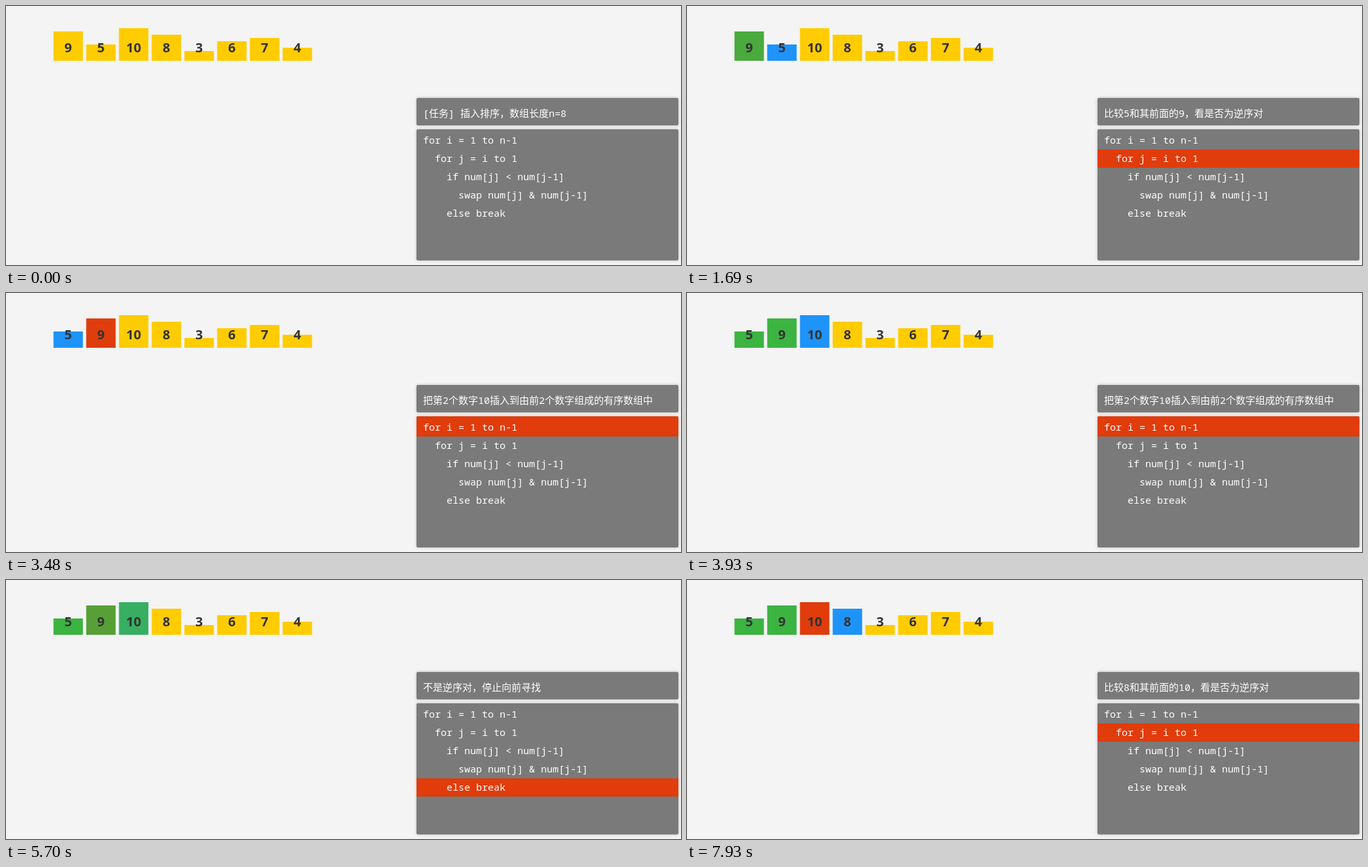
An HTML page for the animation above (8000 ms loop, 1031x397 px).

```html
<!DOCTYPE html>
<html lang="zh-CN">
<head>
<meta charset="utf-8">
<title>插入排序</title>
<style>
  html, body { margin: 0; width: 100%; height: 100%; overflow: hidden; background: #f4f4f4; }
  svg { display: block; }
  .num { font: 700 20px "Noto Sans", "Open Sans", sans-serif; fill: #333; text-anchor: middle; }
  .mono { font: 500 15px "Noto Sans Mono", "Noto Sans CJK SC", "Noto Sans CJK", monospace; fill: #fff; }
  .panel { fill: #7a7a7a; filter: drop-shadow(0 0 2px rgba(0, 0, 0, .25)); }
</style>
</head>
<body>
<svg id="stage" width="1031" height="397" viewBox="0 0 1031 397">
  <rect class="panel" x="627" y="141" width="400" height="42" rx="2"/>
  <rect class="panel" x="627" y="189" width="400" height="201" rx="2"/>
  <path id="mark" fill="#e03c0c"/>
  <text id="message" class="mono" x="637" y="170"></text>
</svg>
<script>
const LOOP = 8000, EASE_MS = 400, GAP = 150;
const YELLOW = [255, 204, 0], GREEN = [60, 180, 65], BLUE = [30, 147, 249], RED = [224, 60, 12];
const values = [9, 5, 10, 8, 3, 6, 7, 4];
const code = ['for i = 1 to n-1', '  for j = i to 1', '    if num[j] < num[j-1]',
  '      swap num[j] & num[j-1]', '    else break'];

const insert = (i, v) => `把第${i}个数字${v}插入到由前${i}个数字组成的有序数组中`;
const compare = (a, b) => `比较${a}和其前面的${b}，看是否为逆序对`;

// at: first visible change, lead: time already eased by then, rows: marked code lines
const steps = [
  { at: 500, end: 950, lead: 55, text: insert(1, 5), rows: [0, 1], paint: { 9: GREEN, 5: BLUE } },
  { at: 1550, end: 1840, lead: 110, text: compare(5, 9), rows: [1, 2], paint: { 9: RED } },
  { at: 2590, end: 3030, lead: 93, text: '是逆序对，交换9和5的位置，继续向前寻找逆序对',
    rows: [2, 4], swap: [9, 5] },
  { at: 3480, end: 3930, lead: 50, text: insert(2, 10), rows: [0, 1],
    paint: { 5: GREEN, 9: GREEN, 10: BLUE } },
  { at: 4520, end: 4960, lead: 55, text: compare(10, 9), rows: [1, 2], paint: { 9: RED } },
  { at: 5550, end: 5850, lead: 110, text: '不是逆序对，停止向前寻找', rows: [4, 5],
    paint: { 9: GREEN, 10: GREEN } },
  { at: 6590, end: 6890, lead: 110, text: insert(3, 8), rows: [0, 1], paint: { 8: BLUE } },
  { at: 7480, end: 7930, lead: 50, text: compare(8, 10), rows: [1, 2], paint: { 10: RED } },
];

const stage = document.getElementById('stage');
const mark = document.getElementById('mark');
const message = document.getElementById('message');

function add(parent, tag, attrs, text = '') {
  const el = document.createElementNS('http://www.w3.org/2000/svg', tag);
  for (const key in attrs) el.setAttribute(key, attrs[key]);
  el.textContent = text;
  return parent.appendChild(el);
}

code.forEach((line, i) => {
  const indent = line.length - line.trimStart().length;
  add(stage, 'text', { class: 'mono', x: 637 + indent * 9, y: 211 + i * 28 }, line.trim());
});

const bars = values.map(v => {
  const group = add(stage, 'g', {});
  const rect = add(group, 'rect', { y: 84 - v * 5, width: 45, height: v * 5 });
  add(group, 'text', { class: 'num', x: 22.5, y: 70.5 }, v);
  return { v, group, rect };
});

const mix = (a, b, p) => a + (b - a) * p;
const cubicInOut = p => p < .5 ? 4 * p ** 3 : 1 - 4 * (1 - p) ** 3;

// The picture advances in ticks of GAP while a step is easing.
function progress(step, t) {
  if (t >= step.end) return 1;
  const tick = Math.floor((t - step.at) / GAP) * GAP;
  return cubicInOut(Math.min(1, (tick + step.lead) / EASE_MS));
}

function markPath([from, to]) {
  const top = from ? 192 + from * 28 : 189;
  const bottom = 192 + to * 28;
  const r = from ? 0 : 2;
  return `M627 ${bottom}V${top + r}q0 ${-r} ${r} ${-r}H${1027 - r}q${r} 0 ${r} ${r}V${bottom}Z`;
}

function draw(t) {
  const place = {}, color = {};
  values.forEach((v, i) => { place[v] = i; color[v] = YELLOW; });
  let text = '[任务] 插入排序，数组长度n=8', rows = null;

  for (const step of steps) {
    if (t < step.at) break;
    const p = progress(step, t);
    text = step.text;
    rows = step.rows;
    for (const v in step.paint) {
      color[v] = color[v].map((c, i) => mix(c, step.paint[v][i], p));
    }
    if (step.swap) {
      const [a, b] = step.swap, from = place[a], to = place[b];
      place[a] = mix(from, to, p);
      place[b] = mix(to, from, p);
    }
  }

  for (const { v, group, rect } of bars) {
    group.setAttribute('transform', `translate(${72.5 + place[v] * 50} 0)`);
    rect.setAttribute('fill', `rgb(${color[v].map(Math.round)})`);
  }
  mark.setAttribute('d', rows ? markPath(rows) : '');
  if (message.textContent !== text) message.textContent = text;
}

const start = performance.now();
function frame() {
  draw((performance.now() - start) % LOOP);
  requestAnimationFrame(frame);
}
draw(0);
requestAnimationFrame(frame);
</script>
</body>
</html>
```
